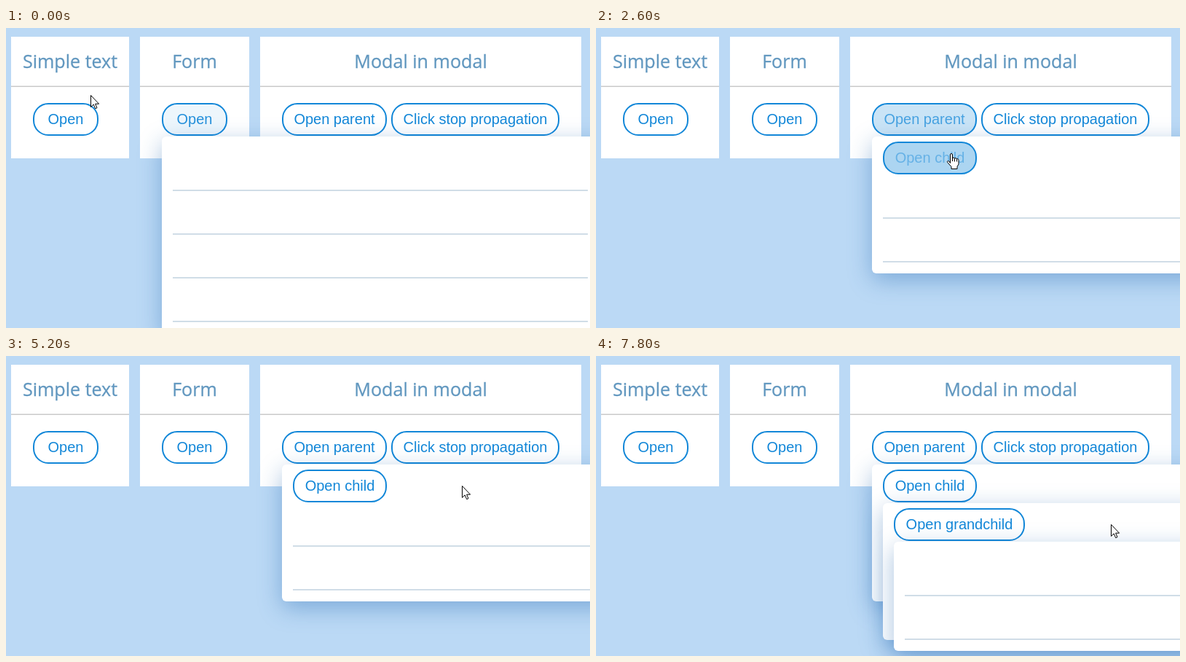
Animation, 802 px wide and 412 px high, one loop 8000 ms. Source, as an HTML page:

```html
<!DOCTYPE html>
<html lang="en">
<head>
<meta charset="utf-8">
<title>Nested modals</title>
<style>
  html, body { margin: 0; width: 100%; height: 100%; overflow: hidden; background: #bbd9f5; }
  svg { display: block; }
  .head, .copy {
    font-family: "Open Sans", "Noto Sans", sans-serif;
    fill: #6197bf; stroke: #6197bf; stroke-width: .3;
  }
  .head { font-size: 25.1px; text-anchor: middle; }
  .copy { font-size: 19.3px; }
  .label { font: 20px "Liberation Sans", Arial, sans-serif; text-anchor: middle; }
  .sheet { fill: #fff; filter: drop-shadow(0 9px 16px rgba(10, 85, 165, .36)); }
  .rule { stroke: #d0dde7; stroke-width: 2; }
</style>
</head>
<body>
<svg id="stage" width="802" height="412" viewBox="0 0 802 412"></svg>
<script>
const LOOP = 8000, STEP = 200, FADE = 400;
const BLUE = [18, 135, 216], WHITE = [255, 255, 255];
const ROW = 60, PAD = 15;
const stage = document.getElementById('stage');
const buttons = [], modals = [];

function add(parent, tag, attrs, text) {
  const el = document.createElementNS('http://www.w3.org/2000/svg', tag);
  for (const k in attrs) el.setAttribute(k, attrs[k]);
  if (text) el.textContent = text;
  parent.appendChild(el);
  return el;
}

// hovers: [enter, leave] times of the pointer
function button(parent, x, y, width, text, hovers = []) {
  const box = add(parent, 'rect', {
    x: x + 1, y: y + 1, width: width - 2, height: 43, rx: 20,
    stroke: `rgb(${BLUE})`, 'stroke-width': 2
  });
  const label = add(parent, 'text', { x: x + width / 2, y: y + 29, class: 'label' }, text);
  const item = { x, y, box, label, hovers };
  buttons.push(item);
  return item;
}

function card(x, width, title) {
  add(stage, 'rect', { x, y: 12, width, height: 167, fill: '#fff' });
  add(stage, 'rect', { x, y: 79.5, width, height: 1.5, fill: '#cacaca' });
  add(stage, 'text', { x: x + width / 2, y: 55, class: 'head' }, title);
}

// A sheet hanging below its button; spans: [open, close] times
function sheet(opener, height, spans) {
  const x = opener.x, y = opener.y + 46;
  const g = add(stage, 'g', {});
  add(g, 'rect', { x, y, width: 900, height, rx: 6, class: 'sheet' });
  modals.push({ g, spans });
  return { g, x, y };
}

function form(opener, rows, top, spans) {
  const s = sheet(opener, top + (rows - 1) * ROW + 16, spans);
  for (let i = 0; i < rows; i++) {
    const y = s.y + top + i * ROW;
    add(s.g, 'line', { x1: s.x + PAD, x2: s.x + PAD + 570, y1: y, y2: y, class: 'rule' });
  }
  return s;
}

const inner = (s, ...rest) => button(s.g, s.x + PAD, s.y + 7, ...rest);

card(7, 162, 'Simple text');
card(184, 150, 'Form');
card(349, 441, 'Modal in modal');
const openText = button(stage, 37, 103, 90, 'Open', [[150, 900]]);
const openForm = button(stage, 214, 103, 90, 'Open', [[-900, -370]]);
const openParent = button(stage, 379, 103, 144, 'Open parent', [[1700, 2290]]);
button(stage, 529, 103, 231, 'Click stop propagation');

form(openForm, 4, 74, [[0, 600]]);

const note = sheet(openText, 116, [[600, 1400]]);
[
  'Lorem ipsum dolor sit amet, consectetur adipiscing elit. Maecenas vehicula, erat in vestibulum',
  'libero eu purus. Etiam bibendum vestibulum massa at venenatis. Suspendisse eget mattis',
  'vulputate vehicula. Sed condimentum, diam quis dapibus cursus, magna tellus dignissim',
  'molestie odio at lobortis vulputate.'
].forEach((line, i) => add(note.g, 'text', { x: note.x, y: note.y + 22 + 29 * i, class: 'copy' }, line));

const parent = form(openParent, 2, 112, [[2200, LOOP]]);
const openChild = inner(parent, 129, 'Open child', [[2460, 3080], [5950, 6500]]);
const child = form(openChild, 2, 112, [[3000, 5200], [6400, LOOP]]);
const openGrandchild = inner(child, 180, 'Open grandchild', [[3120, 3800], [6550, 7300]]);
form(openGrandchild, 2, 74, [[3400, 5200], [7200, LOOP]]);

const pointer = add(stage, 'g', { stroke: '#000', fill: '#fff', 'stroke-linejoin': 'round' });
const arrow = add(pointer, 'path', {
  d: 'M.5 .5V16.5L4.2 13L6.7 18.7L9 17.7L6.6 12.2H11.6Z'
});
const hand = add(pointer, 'path', {
  transform: 'translate(-6 0)',
  d: 'M4.5 13.5V2Q4.5 .5 6 .5T7.5 2V7Q7.5 6 9 6T10.5 7.5Q10.5 6.7 12 6.7T13.5 8.2' +
     'Q13.5 7.5 14.8 7.7Q16 8 16 9.5V15L14 18.5V21.5H6V18.5L.7 12.5Q0 11 1.2 10.5' +
     'Q2.5 10 4.5 13.5ZM7.5 7v4M10.5 7.5v4M13.5 8.2v3.3'
});

// Pointer moves: where to, when, and how far the way bows upwards
const HOME = [116, 92], ON_CHILD = [488, 172], ON_GRANDCHILD = [492, 230];
const moves = [
  { from: 0, to: 400, at: [97, 114] },
  { from: 800, to: 1200, at: [205, 48] },
  { from: 1200, to: 1800, at: [445, 118] },
  { from: 2200, to: 2600, at: ON_CHILD },
  { from: 3000, to: 3300, at: ON_GRANDCHILD },
  { from: 3600, to: 4000, at: [559, 264] },
  { from: 4000, to: 4800, at: [626, 178] },
  { from: 5600, to: 6200, at: ON_CHILD, bow: 18 },
  { from: 6400, to: 6900, at: ON_GRANDCHILD },
  { from: 7200, to: 7800, at: [707, 231], bow: 55 }
];

const clamp = v => Math.max(0, Math.min(1, v));
const smooth = u => u * u * (3 - 2 * u);
const lerp = (a, b, k) => a.map((v, i) => v + (b[i] - v) * k);
const within = (t, spans) => spans.some(([a, b]) => t >= a && t < b);
const glow = (t, hovers) => Math.max(0, ...hovers.map(([a, b]) =>
  Math.min(clamp((t - a) / FADE), 1 - clamp((t - b) / FADE))));

function place(t) {
  return moves.reduce((pos, { from, to, at, bow = 0 }) => {
    const k = smooth(clamp((t - from) / (to - from)));
    const [x, y] = lerp(pos, at, k);
    return [x, y - bow * Math.sin(Math.PI * k)];
  }, HOME);
}

function draw(t) {
  for (const { g, spans } of modals) {
    g.style.display = within(t, spans) ? '' : 'none';
  }
  for (const { box, label, hovers } of buttons) {
    const k = glow(t, hovers);
    box.setAttribute('fill', `rgba(${BLUE},${k})`);
    label.setAttribute('fill', `rgb(${lerp(BLUE, WHITE, k).map(Math.round)})`);
  }
  const over = buttons.some(b => within(t, b.hovers));
  arrow.style.display = over ? 'none' : '';
  hand.style.display = over ? '' : 'none';
  pointer.setAttribute('transform', `translate(${place(t).map(Math.round)})`);
}

const start = performance.now();
function tick(now) {
  const t = Math.max(0, now - start) % LOOP;
  draw(Math.floor(t / STEP) * STEP);
  requestAnimationFrame(tick);
}
draw(0);
requestAnimationFrame(tick);
</script>
</body>
</html>
```
